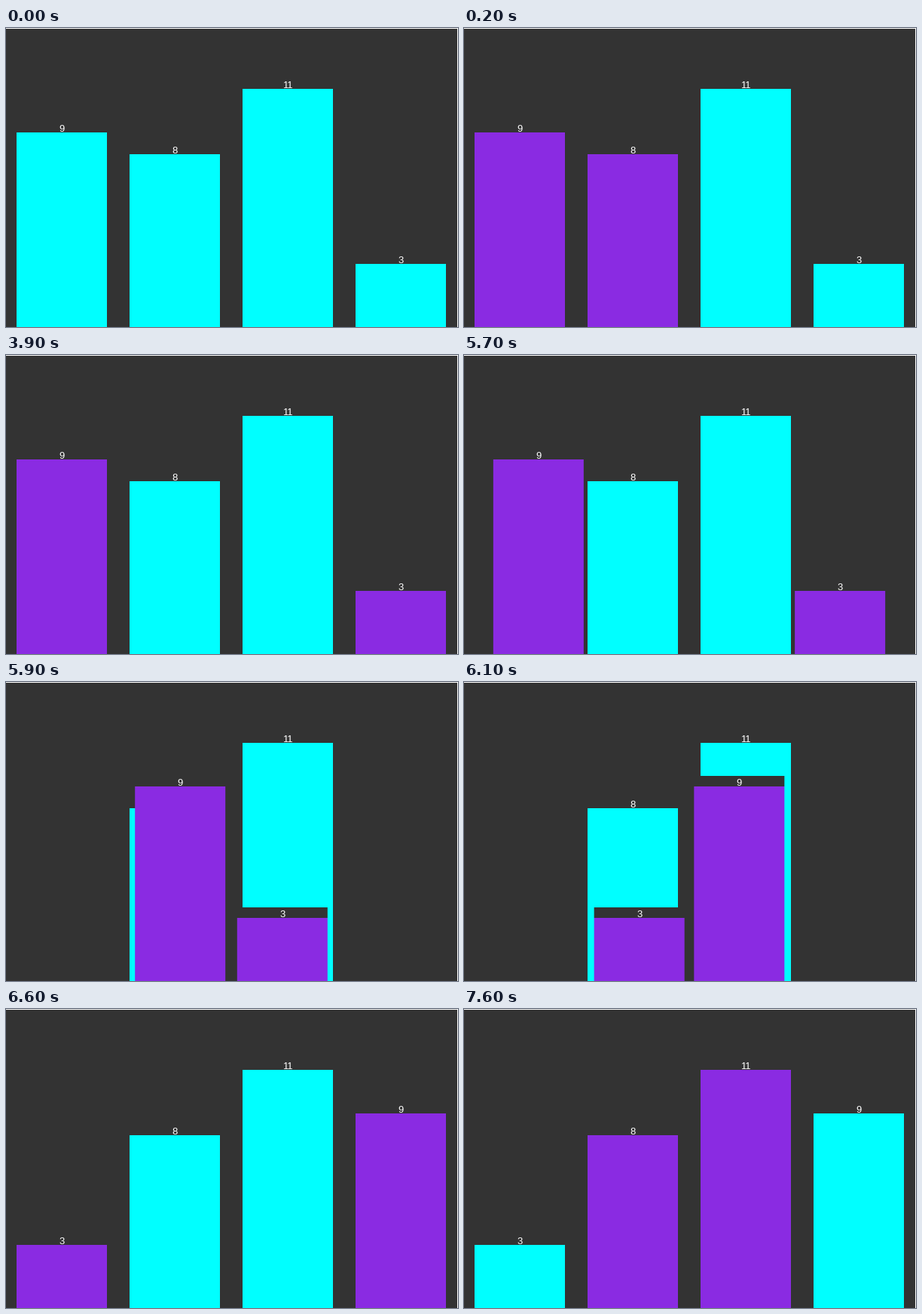
A matplotlib script for the animation above (8000 ms loop, 600x398 px).

```python
import matplotlib.pyplot as plt
from matplotlib.animation import FuncAnimation
from matplotlib.patches import Rectangle

W, H, DPI = 600, 398, 100
STEP, LOOP = 100, 8000
BACK, IDLE, ACTIVE = "#333333", "#00ffff", "#8a2be2"
BAR_W, LABEL_H = 120, 14
SLOTS = [14, 164, 314, 464]
TOPS = {9: 139, 8: 168, 11: 81, 3: 314}
LAYERS = {8: 1, 11: 2, 9: 3, 3: 4}

# Start time of each highlighted pair of values
HIGHLIGHTS = [(0, ()), (200, (9, 8)), (2100, (9, 11)),
              (3900, (9, 3)), (7600, (8, 11))]
SWAP_START, SWAP_END, SWAP_TIME = 5607, 6600, 1310


def ease(x):
    """CSS 'ease': cubic-bezier(.25, .1, .25, 1), solved by bisection."""
    lo, hi = 0.0, 1.0
    for _ in range(40):
        s = (lo + hi) / 2
        if 0.75 * s * (1 - s) + s ** 3 < x:
            lo = s
        else:
            hi = s
    return 0.3 * (1 - s) ** 2 * s + 3 * (1 - s) * s ** 2 + s ** 3


def swap_progress(t):
    if t < SWAP_START:
        return 0
    if t >= SWAP_END:
        return 1
    return ease((t - SWAP_START) / SWAP_TIME)


class Bar:
    def __init__(self, ax, value):
        z, self.top = LAYERS[value], TOPS[value]
        self.label = Rectangle((0, self.top - LABEL_H), BAR_W, LABEL_H,
                               fc=BACK, lw=0, snap=False, zorder=z)
        self.body = Rectangle((0, self.top), BAR_W, H - self.top,
                              lw=0, snap=False, zorder=z + 0.1)
        ax.add_patch(self.label)
        ax.add_patch(self.body)
        self.text = ax.text(0, self.top - 1, str(value), color="white",
                            family="Liberation Sans", size=13 * 72 / DPI,
                            ha="center", va="baseline", zorder=z + 0.2)

    def place(self, x, color):
        self.label.set_x(x)
        self.body.set_x(x)
        self.body.set_facecolor(color)
        self.text.set_x(x + BAR_W / 2)


fig = plt.figure(figsize=(W / DPI, H / DPI), dpi=DPI, facecolor="white")
ax = fig.add_axes([0, 0, 1, 1])
ax.set(xlim=(0, W), ylim=(H, 0))
ax.axis("off")
ax.add_patch(Rectangle((0, 1), W - 1, H - 1, fc=BACK, lw=0, zorder=0))
bars = {value: Bar(ax, value) for value in TOPS}


def update(frame):
    t = frame * STEP
    active = [pair for start, pair in HIGHLIGHTS if start <= t][-1]
    shift = (SLOTS[3] - SLOTS[0]) * swap_progress(t)
    places = {9: SLOTS[0] + shift, 8: SLOTS[1],
              11: SLOTS[2], 3: SLOTS[3] - shift}
    for value, bar in bars.items():
        bar.place(places[value], ACTIVE if value in active else IDLE)
    return []


anim = FuncAnimation(fig, update, frames=LOOP // STEP, interval=STEP,
                     init_func=lambda: update(0), repeat=True,
                     repeat_delay=0, blit=False)
plt.show()
```
